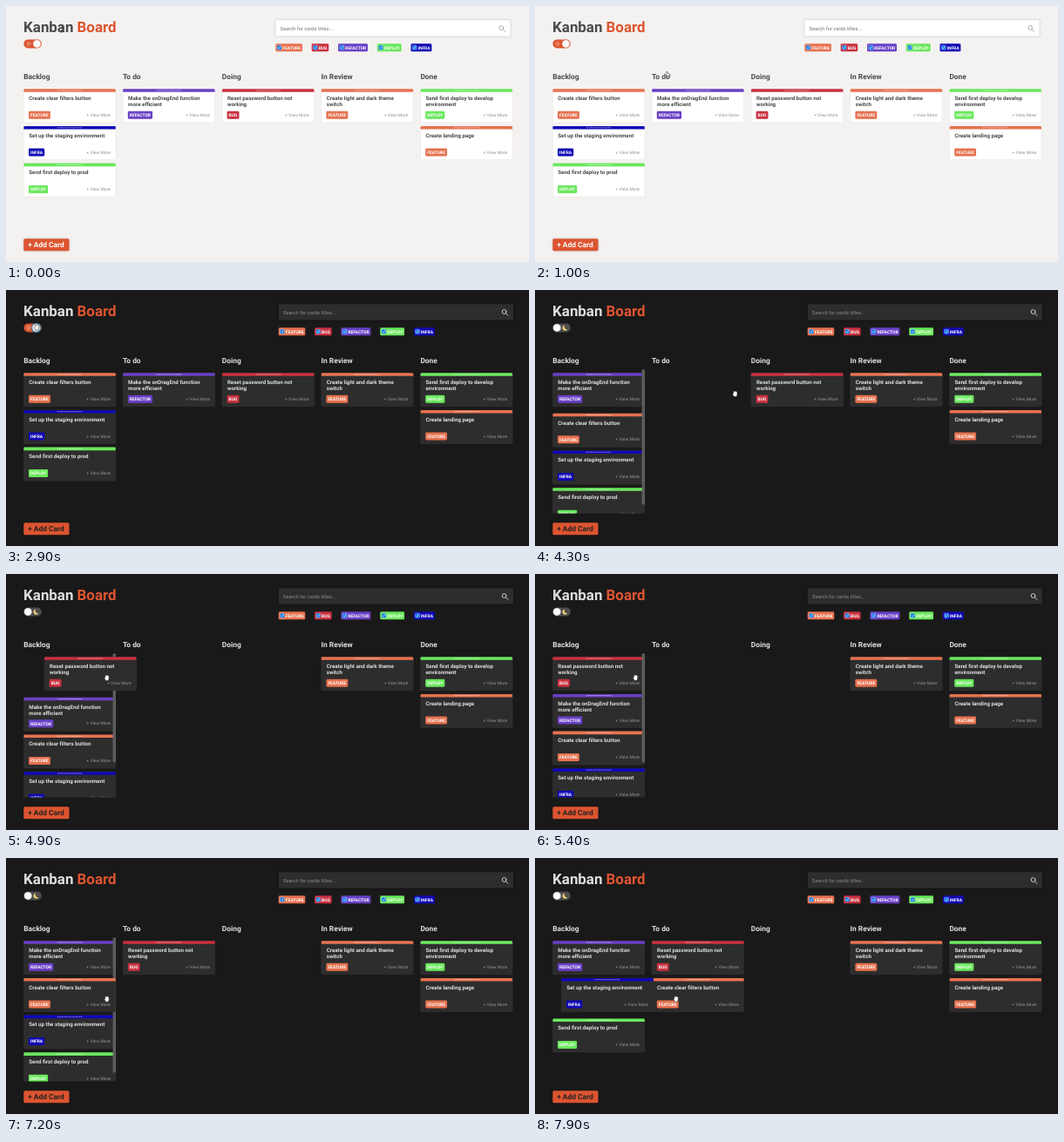
These frames come from a looping animation (600 by 294 pixels, 8 s). An HTML page:

```html
<!DOCTYPE html>
<html lang="en">
<head>
<meta charset="utf-8">
<title>Kanban Board</title>
<style>
html, body { margin: 0; width: 100%; height: 100%; overflow: hidden; }
svg {
  display: block; width: 600px; height: 294px;
  --bg: #f4f2f1; --ink: #4a4a4a; --card: #fff; --edge: #e9e7e5; --soft: #919191;
  --hint: #757575; --icon: #a5a5a5; --btn: #fff; --shade: #0003;
  background: var(--bg); text-rendering: geometricPrecision;
  font-family: Roboto, Arial, sans-serif;
}
svg.dark {
  --bg: #1a1919; --ink: #dedede; --card: #2d2d2d; --edge: #333; --soft: #969696;
  --hint: #8c8c8c; --icon: #ddd; --btn: #222; --shade: #0005;
}
text { white-space: pre; }
.bold { font-weight: 700; }
.lift { filter: drop-shadow(0 .8px 1.4px var(--shade)); }
</style>
</head>
<body>
<svg id="stage" viewBox="0 0 600 294" xmlns="http://www.w3.org/2000/svg">
  <defs><clipPath id="view"><rect x="14" y="91.5" width="118" height="165"/></clipPath></defs>
</svg>
<script>
const LOOP = 8000, STEP = 100;
const LEFT = 20.4, TOP = 95.2, COL = 113.8, ROW = 42.7, CARD_W = 105.4, CARD_H = 38.5;
const VIEW_TOP = 91.5, VIEW_H = 165;
const ORANGE = '#dc5430';
const DARK_AT = 2890, SHIFT_AT = 1300;
const SETTLE = 250, GAP = .09, LEAD = 2.4;
const SCROLL = { start: 5600, end: 6400 };
const GRAB = { x: 95, y: 24 };
const stage = document.getElementById('stage');

const TAGS = {
  FEATURE: '#e6714f', BUG: '#c9303f', REFACTOR: '#6a40c6', DEPLOY: '#6ae85c', INFRA: '#1108b5'
};
const BOARD = {
  'Backlog': [
    ['FEATURE', 'Create clear filters button'],
    ['INFRA', 'Set up the staging environment'],
    ['DEPLOY', 'Send first deploy to prod']
  ],
  'To do': [['REFACTOR', 'Make the onDragEnd function', 'more efficient']],
  'Doing': [['BUG', 'Reset password button not', 'working']],
  'In Review': [['FEATURE', 'Create light and dark theme', 'switch']],
  'Done': [
    ['DEPLOY', 'Send first deploy to develop', 'environment'],
    ['FEATURE', 'Create landing page']
  ]
};

function el(parent, tag, attrs = {}, content) {
  const node = document.createElementNS('http://www.w3.org/2000/svg', tag);
  for (const key in attrs) node.setAttribute(key, attrs[key]);
  if (content) node.textContent = content;
  parent.append(node);
  return node;
}
const group = (parent, attrs) => el(parent, 'g', attrs);
const box = (parent, x, y, width, height, fill, rx = 0, more = {}) =>
  el(parent, 'rect', { x, y, width, height, fill, rx, ...more });
const write = (parent, content, x, y, size, fill, more = {}) =>
  el(parent, 'text', { x, y, fill, 'font-size': size, ...more }, content);
const BOLD = { class: 'bold' };
const place = (node, x, y) => node.setAttribute('transform', `translate(${x.toFixed(2)} ${y.toFixed(2)})`);
const show = (node, on) => node.setAttribute('visibility', on ? 'visible' : 'hidden');

const clamp = p => Math.max(0, Math.min(1, p));
const smooth = p => { p = clamp(p); return p * p * (3 - 2 * p); };
const mix = (a, b, p) => a + (b - a) * p;

// A coloured label as wide as its text; returns its width.
function chip(parent, name, inset, pad) {
  const back = box(parent, 0, 0, 0, 9, TAGS[name], 1.4);
  const label = write(parent, name, inset, 6.3, 4.95, '#fff', BOLD);
  const width = label.getComputedTextLength() + inset + pad;
  back.setAttribute('width', width);
  return width;
}

// Heading and theme toggle
const title = write(stage, '', LEFT - .3, 30.4, 16.9, 'var(--ink)', BOLD);
el(title, 'tspan', {}, 'Kanban ');
el(title, 'tspan', { fill: '#de5530' }, 'Board');

const toggle = group(stage, { transform: 'translate(20.4 43.4)' });
const track = box(toggle, 0, -5, 20.4, 10, ORANGE, 5);
const sun = group(toggle, { fill: 'none', stroke: '#f7c9a8' });
el(sun, 'circle', { cx: 5.5, r: 1.3, 'stroke-width': .7 });
el(sun, 'circle', { cx: 5.5, r: 2.6, 'stroke-width': .9, 'stroke-dasharray': '.7 1.34' });
const moon = el(toggle, 'path', { d: 'M13.8-2.8a3 3 0 1 0 2.9 4.3a2.7 2.7 0 0 1-2.9-4.3z', fill: '#f3cf78' });
const ring = el(toggle, 'circle', { r: 5.4, fill: '#0099e0' });
const thumb = el(toggle, 'circle', { r: 4.5, fill: '#fafafa', 'stroke-width': .3 });

// Search and filters
const tools = group(stage);
box(tools, 312.8, 16.2, 269.2, 18.3, 'var(--card)', 1.5, { class: 'lift' });
write(tools, 'Search for cards titles...', 318, 27.6, 5.75, 'var(--hint)');
el(tools, 'path', {
  d: 'M574 25a2.4 2.4 0 1 0-4.8 0a2.4 2.4 0 1 0 4.8 0M573.4 26.8l2.7 2.6',
  fill: 'none', stroke: 'var(--icon)', 'stroke-width': .9, 'stroke-linecap': 'round'
});
let filterX = 312.7;
for (const name in TAGS) {
  const g = group(tools, { transform: `translate(${filterX} 43.3)` });
  filterX += chip(g, name, 8, 1.8) + 10.8;
  box(g, 1.7, 1.9, 5, 5, '#0b75e8', .8, { stroke: '#e8f1fb', 'stroke-width': .35 });
  el(g, 'path', { d: 'M2.8 4.4l1.1 1.2L5.7 3.1', fill: 'none', stroke: '#fff', 'stroke-width': .7 });
}

const add = group(stage);
box(add, 20.3, 267.2, 52.2, 14, ORANGE, 1.5, { class: 'lift' });
write(add, '+ Add Card', 25.2, 277.4, 8.4, 'var(--btn)', BOLD);

// Columns and cards
const list = group(stage, { 'clip-path': 'url(#view)' });
const bar = box(stage, 122.6, VIEW_TOP, 3.4, 0, '#5c5c5c');
const free = group(stage);

function makeCard([tag, ...lines]) {
  const g = group(free);
  box(g, 0, .2, CARD_W, CARD_H - .2, 'var(--card)', 1.2, { stroke: 'var(--edge)', 'stroke-width': .6 });
  el(g, 'path', { d: `M0 3.6V1.2Q0 0 1.2 0H${CARD_W - 1.2}q1.2 0 1.2 1.2V3.6z`, fill: TAGS[tag] });
  el(g, 'path', { d: 'M38.5 1.8h29', stroke: '#fff', 'stroke-width': .8, 'stroke-dasharray': '1 .7', opacity: .75 });
  lines.forEach((line, i) => write(g, line, 5.9, 12.8 + i * 7.4, 6.2, 'var(--ink)', BOLD));
  chip(group(g, { transform: 'translate(5.6 25.5)' }), tag, 2, 2.1);
  write(g, '+ View More', 99.6, 31.7, 5, 'var(--soft)', { 'text-anchor': 'end' });
  return g;
}

const columns = Object.entries(BOARD).map(([name, items], i) => {
  write(stage, name, LEFT + i * COL - .2, 83.5, 8.4, 'var(--ink)', BOLD);
  return items.map(makeCard);
});
const cards = columns.flat();
const [clearFilters, staging, , refactor, resetBug] = cards;

// Each drag takes a card to the given column and row.
const drags = [
  { card: refactor, col: 0, row: 0, start: 3800, end: 4100 },
  { card: resetBug, col: 0, row: 0, start: 4500, end: 5000 },
  { card: resetBug, col: 1, row: 0, start: 6500, end: 6900 },
  { card: clearFilters, col: 1, row: 1, start: 7200, end: 7500 },
  { card: staging, col: 1, row: 1, start: 7800, end: 8350 }
];

function slots() {
  const map = new Map();
  columns.forEach((column, col) => column.forEach((card, row) => map.set(card, { col, row })));
  return map;
}

for (const drag of drags) {
  drag.before = slots();
  const from = drag.before.get(drag.card);
  columns[from.col].splice(from.row, 1);
  columns[drag.col].splice(drag.row, 0, drag.card);
  drag.after = slots();
}

// Pointer stops: a few by hand, the rest at both ends of every drag.
const grabPoint = ({ col, row }) => [LEFT + col * COL + GRAB.x, TOP + row * ROW + GRAB.y];
const stops = [
  [500, 64, 27], [1700, 295.5, 155], [2200, 295.5, 155], [2600, 35, 43], [3600, 35, 43],
  [5450, 115, 119], [SCROLL.start, 120, 114.5], [SCROLL.end, 120, 114.5],
  ...drags.flatMap(d => [
    [d.start, ...grabPoint(d.before.get(d.card))],
    [d.start + (d.end - d.start) / LEAD, ...grabPoint(d)],
    [d.end, ...grabPoint(d)]
  ])
].sort((a, b) => a[0] - b[0]);

const shapes = {
  arrow: 'M0 0V6.4L1.5 5L2.6 7.3L3.6 6.8L2.6 4.6H4.6Z',
  hand: 'M-2.6 .2L-1.6-.6V-2.6Q-1.2-3.4-.6-2.7Q.1-3.6 .7-2.7Q1.4-3.3 1.9-2.4Q2.7-2.7 2.8-1.8V1L1.9 3.3H-1Z',
  beam: 'M-1.4-3H1.4M0-3V3M-1.4 3H1.4'
};
const pointer = el(stage, 'path', { fill: '#fff', stroke: '#222', 'stroke-width': .6 });

function drawToggle(t) {
  const age = Math.max(0, t - DARK_AT);
  const fade = clamp(age / 200);
  const slide = 1 - (1 - clamp(age / 500)) ** 4;
  const fill = `rgb(${[220, 84, 48].map(c => Math.round(mix(c, 77, fade)))})`;
  track.setAttribute('fill', fill);
  thumb.setAttribute('stroke', fill);
  for (const disc of [ring, thumb]) disc.setAttribute('cx', mix(15.1, 4.8, slide));
  show(ring, age && t < drags[0].start);
  sun.setAttribute('opacity', 1 - fade);
  moon.setAttribute('opacity', fade);
}

function cardSlot(card, drag, t) {
  const u = clamp((t - drag.start) / (drag.end - drag.start));
  const from = drag.before.get(card), to = drag.after.get(card);
  if (card === drag.card) {
    const p = smooth(u);
    return { col: mix(from.col, to.col, p), row: mix(from.row, to.row, p), held: u < 1 };
  }
  // Neighbours make way mid-drag and keep a little extra gap until it settles.
  const holder = (u < .5 ? drag.before : drag.after).get(drag.card);
  const current = u < .5 ? from : to;
  const below = current.col === holder.col && current.row > holder.row;
  const gap = below && t > drag.start && t < drag.end + SETTLE ? GAP : 0;
  return { col: from.col, row: mix(from.row, to.row, smooth((u - .3) / .5)) + gap };
}

function drawCards(t) {
  const drag = drags.findLast(d => d.start <= t) || drags[0];
  const halfway = t > (drag.start + drag.end) / 2;
  const count = [...(halfway ? drag.after : drag.before).values()].filter(s => s.col === 0).length;
  const content = 5 + count * ROW;
  const ratio = Math.min(1, VIEW_H / content);
  const swing = Math.sin(Math.PI * clamp((t - SCROLL.start) / (SCROLL.end - SCROLL.start))) ** 2;
  const scroll = Math.max(0, content - VIEW_H) * swing;

  for (const card of cards) {
    const { col, row, held } = cardSlot(card, drag, t);
    const listed = col === 0 && !held;
    const home = listed ? list : free;
    if (card.parentNode !== home || held) home.append(card);
    place(card, LEFT + col * COL, TOP + row * ROW - (listed ? scroll : 0));
  }
  show(bar, ratio < 1);
  bar.setAttribute('height', VIEW_H * ratio);
  bar.setAttribute('y', VIEW_TOP + scroll * ratio);
  bar.setAttribute('fill', t >= SCROLL.start && t <= SCROLL.end ? '#777' : '#5c5c5c');
  return scroll * ratio;
}

function drawPointer(t, thumbShift) {
  const next = stops.find(s => s[0] > t) || stops[stops.length - 1];
  const last = stops.findLast(s => s[0] <= t) || stops[0];
  const p = smooth((t - last[0]) / (next[0] - last[0] || 1));
  place(pointer, mix(last[1], next[1], p), mix(last[2], next[2], p) + thumbShift);
  const scrolling = t > SCROLL.start - 200 && t <= SCROLL.end;
  const kind = t < 600 ? 'beam' : t < 2600 || scrolling ? 'arrow' : 'hand';
  pointer.setAttribute('d', shapes[kind]);
}

function render(t) {
  stage.classList.toggle('dark', t >= DARK_AT);
  place(tools, t < SHIFT_AT ? -3.4 : 0, 0);
  drawToggle(t);
  drawPointer(t, drawCards(t));
}

const start = performance.now();
function tick() {
  const t = (performance.now() - start) % LOOP;
  render(Math.floor(t / STEP) * STEP);
  requestAnimationFrame(tick);
}
tick();
</script>
</body>
</html>
```
